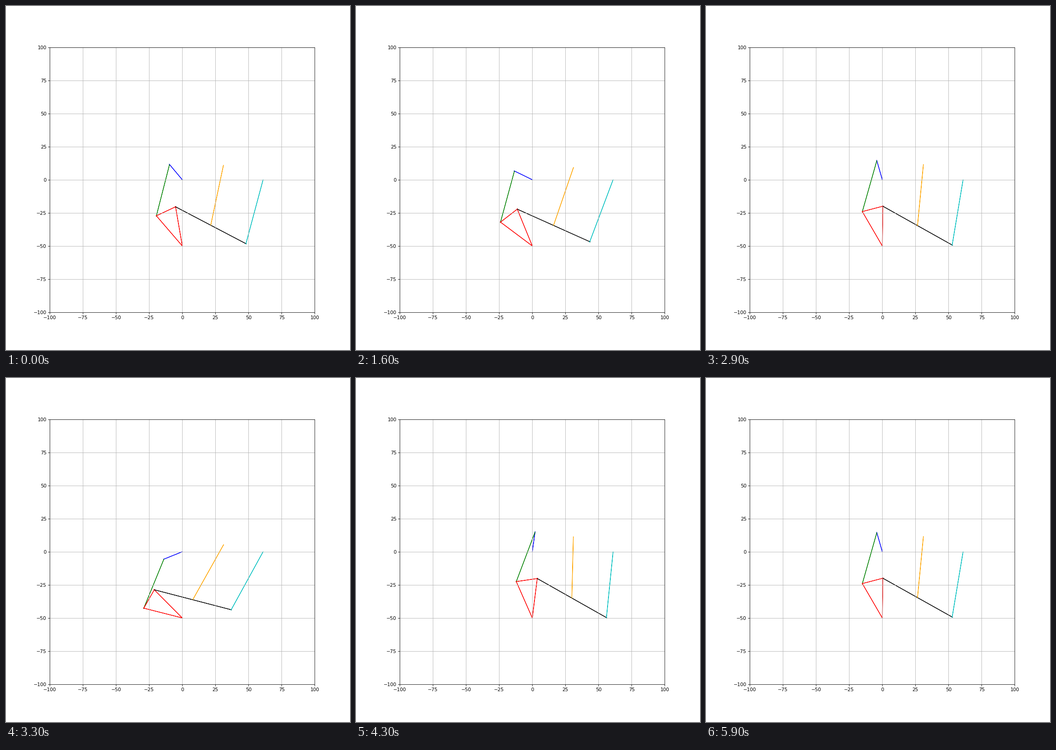
A matplotlib script that plays this animation: 748x748 px, repeating every 6 s.

```python
import numpy as np
import matplotlib.pyplot as plt
from matplotlib.animation import FuncAnimation

FRAMES = 60
STEP = 2 * np.pi / 15
START = np.radians(130)

CRANK, COUPLER, ROCKER, BASE = 15, 40, 30, 16
BEAM, SWING, ROD = 60, 50, 46

ORIGIN = np.array([0.0, 0.0])
PIVOT = np.array([0.0, -50.0])
ANCHOR = np.array([61.0, 0.0])
SLIDER_X = 31.0
SLIDER_MIN = 5.0
SPREAD = 2 * np.arcsin(BASE / 2 / ROCKER)


def polar(r, angle):
    return r * np.array([np.cos(angle), np.sin(angle)])


def joint(p, q, rp, rq):
    """Meeting point of two bars, on the right-hand side of p -> q."""
    d = np.hypot(*(q - p))
    u = (q - p) / d
    along = (rp**2 - rq**2 + d**2) / (2 * d)
    off = np.sqrt(rp**2 - along**2)
    return p + along * u + off * np.array([u[1], -u[0]])


def bars(frame):
    a = polar(CRANK, START + STEP * frame)
    p = joint(a, PIVOT, COUPLER, ROCKER)
    lean = np.arctan2(*(p - PIVOT)[::-1])
    b = PIVOT + polar(ROCKER, lean - SPREAD)
    c = joint(b, ANCHOR, BEAM, SWING)
    m = (b + c) / 2
    rise = np.sqrt(ROD**2 - (SLIDER_X - m[0]) ** 2)
    # the slider rests on its lower stop
    top = np.array([SLIDER_X, max(m[1] + rise, SLIDER_MIN)])
    return [(ORIGIN, a), (a, p), (PIVOT, p), (PIVOT, b), (p, b),
            (b, c), (ANCHOR, c), (m, top)]


fig, ax = plt.subplots(figsize=(10, 10), dpi=74.8)
ax.set_xlim(-100, 100)
ax.set_ylim(-100, 100)
ax.set_aspect("equal")
ax.grid(True)

COLORS = ["b", "g", "r", "r", "r", "k", "c", "orange"]
arrows = [ax.arrow(0, 0, 1, 1, width=0.1, color=color) for color in COLORS]


def update(frame):
    for arrow, (start, end) in zip(arrows, bars(frame)):
        dx, dy = end - start
        arrow.set_data(x=start[0], y=start[1], dx=dx, dy=dy)
    return arrows


anim = FuncAnimation(fig, update, frames=FRAMES, interval=100,
                     repeat=True, repeat_delay=0, blit=False)
plt.show()
```
